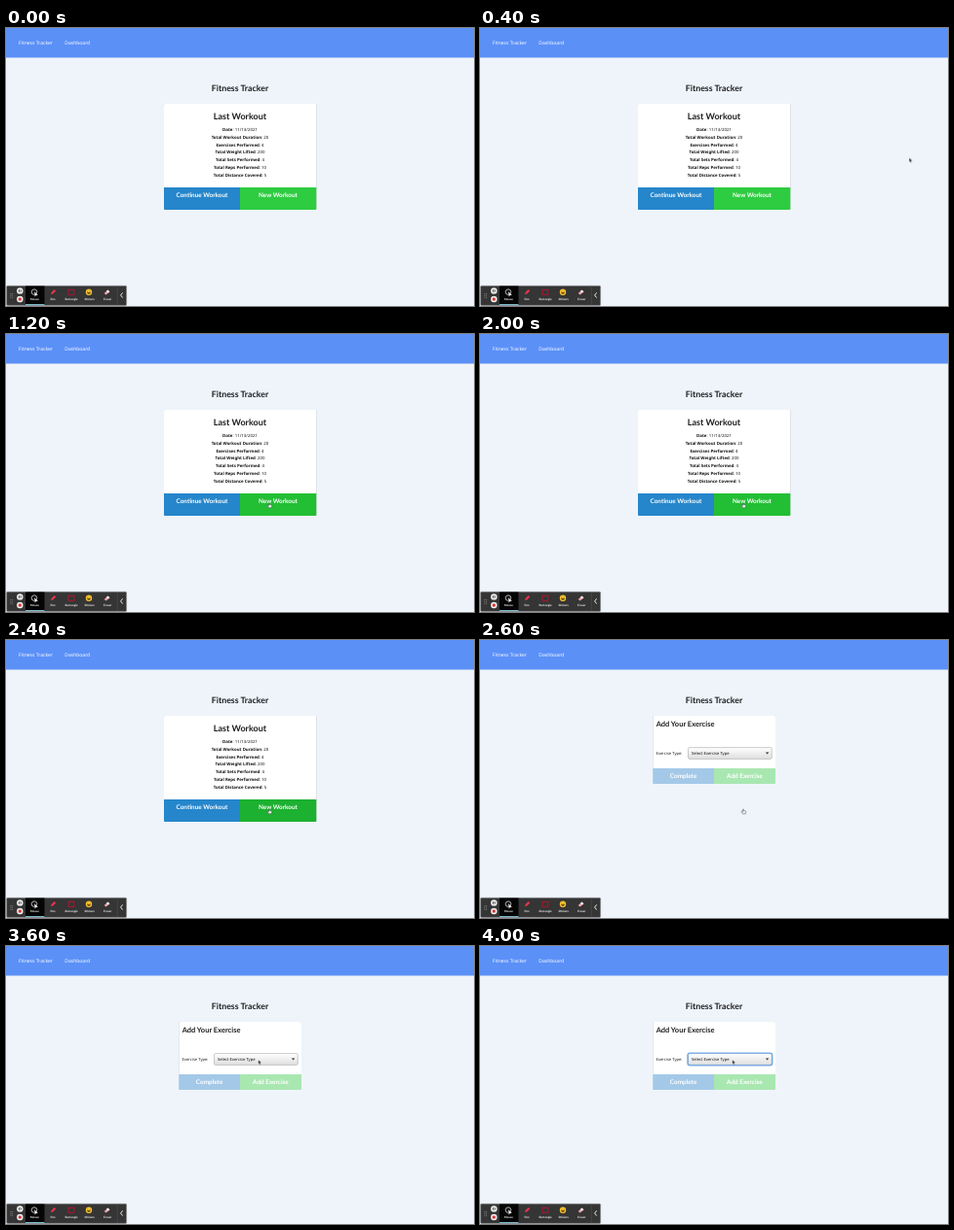
Recreate the animation shown at these times as an HTML page. Size 480 px wide and 286 px high, loop 5 s.

```html
<!DOCTYPE html>
<html lang="en">
<head>
<meta charset="utf-8">
<title>Fitness Tracker</title>
<style>
  html, body { margin: 0; width: 100%; height: 100%; overflow: hidden; background: #eff4fa; }
  svg { display: block; width: 480px; height: 286px; font-family: "Noto Sans", sans-serif; }
  text { text-rendering: geometricPrecision; }
  .lato { font-family: Lato, sans-serif; font-weight: 700; }
  .mid { text-anchor: middle; }
  .button { font-size: 6.4px; fill: #fff; text-anchor: middle; }
  .card { fill: #fff; filter: drop-shadow(0 .4px .7px #8a939c); }
  .label { font: 700 3px Lato, sans-serif; fill: #eee; text-anchor: middle; }
  #stats { font-size: 4.375px; fill: #111; text-anchor: middle; }
  #stats tspan { font-weight: 700; }
</style>
</head>
<body>
<svg viewBox="0 0 480 286">
  <defs>
    <linearGradient id="shade" x2="0" y2="1">
      <stop stop-color="#fff"/><stop offset="1" stop-color="#dedede"/>
    </linearGradient>
  </defs>

  <rect width="480" height="286" fill="#eff4fa"/>
  <rect width="480" height="30.5" fill="#5b90f7"/>
  <g font-size="5" fill="#fff">
    <text x="13" y="17.3">Fitness Tracker</text>
    <text x="60.3" y="17.3">Dashboard</text>
  </g>
  <text class="lato mid" x="240" y="64.7" font-size="8.8" fill="#1d1e1f">Fitness Tracker</text>

  <g id="summary">
    <rect class="card" x="162" y="78" width="156.3" height="109" rx="1"/>
    <text class="lato mid" x="240" y="94.4" font-size="9" fill="#1d1e1f">Last Workout</text>
    <g id="stats"></g>
    <path d="M162 164h78v23h-77q-1 0-1-1z" fill="#2686cb"/>
    <path id="newWorkout" d="M240 164h78.3v22q0 1-1 1H240z" fill="#2ecc40"/>
    <text class="lato button" x="201" y="174.1">Continue Workout</text>
    <text class="lato button" x="279" y="174.1">New Workout</text>
  </g>

  <g id="form" opacity="0">
    <rect class="card" x="177.3" y="78" width="125.7" height="70" rx="1"/>
    <text class="lato" x="180.7" y="88.6" font-size="7.5" fill="#1d1e1f">Add Your Exercise</text>
    <text x="180.6" y="118.1" font-size="4.1" fill="#222">Exercise Type:</text>
    <rect id="ring" x="213.3" y="110.4" width="86.2" height="12.2" rx="2" fill="none"
          stroke="#76aef0" stroke-width="2" opacity="0"/>
    <rect id="select" x="213.5" y="110.6" width="85.8" height="11.8" rx="1.6" fill="url(#shade)"
          stroke="#a9a9a9" stroke-width=".6"/>
    <text x="217" y="118" font-size="4.15" font-weight="500" fill="#111">Select Exercise Type</text>
    <path d="M292.8 115.6h3.6l-1.8 2z" fill="#333"/>
    <path d="M177.3 132H240v16h-61.7q-1 0-1-1z" fill="#a4c9e8"/>
    <path d="M240 132h63v15q0 1-1 1h-62z" fill="#a9e7b1"/>
    <text class="lato button" x="208.6" y="142.1">Complete</text>
    <text class="lato button" x="271.4" y="142.1">Add Exercise</text>
  </g>

  <g id="toolbar">
    <rect x=".6" y="265.2" width="123" height="20.2" rx="1" fill="#353535" stroke="#8b8d90" stroke-width=".5"/>
    <rect x="20" y="265.5" width="19.5" height="19.5" fill="#050505"/>
    <rect x="20" y="284" width="19.5" height="1" fill="#77bdd0"/>
    <path d="M4.8 273v5M6.6 273v5" stroke="#aaa" stroke-width=".8" stroke-dasharray=".8 1.1"/>
    <circle cx="14.3" cy="270.4" r="3.2" fill="#f2f2f2"/>
    <path d="M13.4 269v2.8M15.2 269v2.8" stroke="#333" stroke-width=".8"/>
    <circle cx="14.3" cy="279" r="3.2" fill="#f2f2f2"/>
    <rect x="12.8" y="277.5" width="3" height="3" rx=".4" fill="#d33"/>
    <circle cx="29" cy="271.6" r="2.8" fill="none" stroke="#ddd" stroke-width=".8"/>
    <path d="M29 271l4 3.8-2 .2-1.5 1.4z" fill="#fff" stroke="#111" stroke-width=".3"/>
    <path d="M46 274l.6-2 3-3 1.5 1.5-3 3z" fill="#ef3450"/>
    <rect x="64" y="269.3" width="5.8" height="5" fill="none" stroke="#b5122e" stroke-width="1"/>
    <circle cx="85" cy="271.8" r="3.2" fill="#f7c52e"/>
    <path d="M83.2 272.3q1.8 2.6 3.6 0zM83.7 270.3v1M86.3 270.3v1" fill="#553a10" stroke="#553a10" stroke-width=".5"/>
    <path d="M100.7 273l3.7-3.5 2 1.8-3.7 3.2z" fill="#f3a5ae"/>
    <path d="M104.4 269.5l2 1.8-1.5 1.3-2-1.8z" fill="#eee"/>
    <path d="M114.3 265.5v19.5" stroke="#555" stroke-width=".5"/>
    <path d="M119.6 272.3l-2 2.6 2 2.6" fill="none" stroke="#fff" stroke-width=".9"/>
  </g>

  <g id="pointer" opacity="0">
    <path id="arrow" d="M0 0v4.2l1-.9.7 1.6.8-.4-.7-1.5h1.3z" fill="#111" stroke="#fff" stroke-width=".3"/>
    <path id="hand" d="M-.5 0q.6-.7 1 0v1.4l1.9.4q.5.2.4.8l-.5 1.9h-2.7l-1.6-2q0-.7.8-.4l.7.5z"
          fill="#fff" stroke="#222" stroke-width=".45" opacity="0"/>
  </g>
</svg>

<script>
const LOOP = 5000;
const SVG = "http://www.w3.org/2000/svg";
const byId = id => document.getElementById(id);

function addText(parent, tag, content, attrs = {}) {
  const node = document.createElementNS(SVG, tag);
  for (const name in attrs) node.setAttribute(name, attrs[name]);
  node.append(content);
  parent.append(node);
  return node;
}

const stats = {
  "Date": "11/13/2021",
  "Total Workout Duration": 20,
  "Exercises Performed": 4,
  "Total Weight Lifted": 200,
  "Total Sets Performed": 4,
  "Total Reps Performed": 10,
  "Total Distance Covered": 5
};
Object.entries(stats).forEach(([name, value], i) => {
  const line = addText(byId("stats"), "text", "", { x: 240, y: 105.8 + i * 7.86 });
  addText(line, "tspan", name);
  line.append(`: ${value}`);
});

const tools = { Mouse: 29.3, Pen: 48, Rectangle: 67, Stickers: 85.7, Eraser: 104.3 };
for (const [name, x] of Object.entries(tools)) {
  addText(byId("toolbar"), "text", name, { x, y: 280.2, class: "label" });
}

// Holds each value until the next time in the table.
function hold(id, property, steps) {
  const frames = steps.map(([time, value]) => ({
    offset: time / LOOP, [property]: value, easing: "step-end"
  }));
  frames.push({ offset: 1, [property]: steps[steps.length - 1][1] });
  const animation = byId(id).animate(frames, { duration: LOOP, iterations: Infinity });
  animation.startTime = 0 + start;
}

const start = document.timeline.currentTime ?? performance.now();
const at = (x, y) => `translate(${x}px, ${y}px)`;

hold("summary", "opacity", [[0, 1], [2600, 0]]);
hold("form", "opacity", [[0, 0], [2600, 1]]);
hold("newWorkout", "fill", [[0, "#2ecc40"], [600, "#22be34"], [2200, "#1fb632"], [2400, "#1cb130"]]);
hold("ring", "opacity", [[0, 0], [3800, 1]]);
hold("select", "stroke", [[0, "#a9a9a9"], [3800, "#5c8fc9"]]);
hold("pointer", "opacity", [[0, 0], [400, 1]]);
hold("pointer", "transform", [
  [0, at(440.2, 133.6)], [600, at(277, 172)], [800, at(271, 174)], [1000, at(270, 174.2)],
  [3200, at(267, 154.5)], [3400, at(260, 121)], [3600, at(258.8, 117.2)]
]);
hold("arrow", "opacity", [[0, 1], [600, 0], [3200, 1]]);
hold("hand", "opacity", [[0, 0], [600, 1], [3200, 0]]);
</script>
</body>
</html>
```
